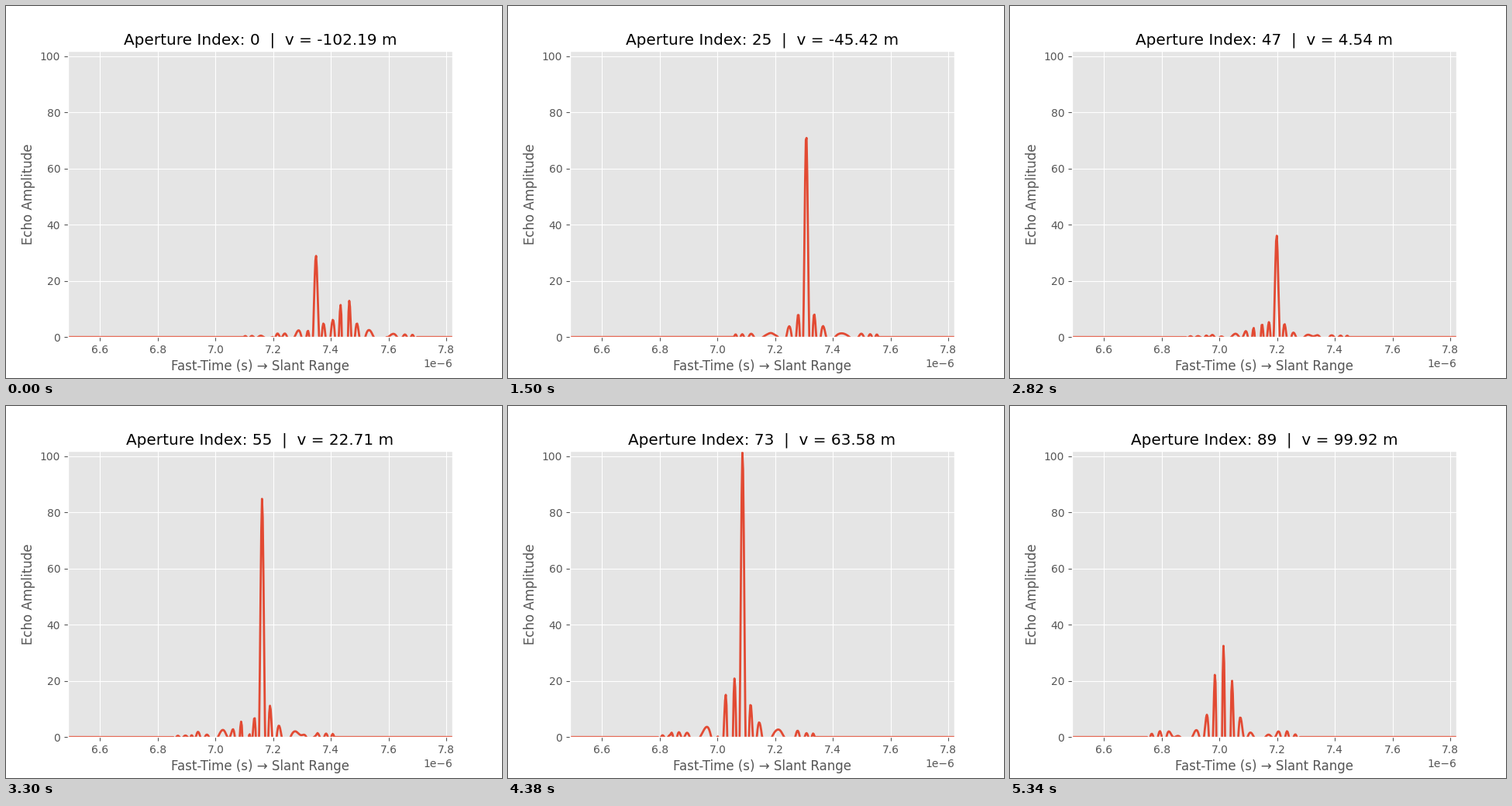
A matplotlib script that plays this animation: 640x480 px, repeating every 5400 ms.

```python
import numpy as np
import matplotlib.pyplot as plt
from matplotlib.animation import FuncAnimation

plt.style.use("ggplot")

# Radar and scene geometry (metres, seconds, hertz)
C = 3e8
CARRIER = 200e6
BAND = 100e6
PULSE = 0.25e-6
XC, YC, X0, Y0, HALF = 1000, 300, 20, 60, 100
STEPS = 90
DV = (XC + YC**2 / XC) * 2 / (16 * Y0)

TARGETS = [(1007.006, 270.1), (999.993, 328.34)]
DELAY = 0.1905e-6
PHASE = -0.29
GAIN = 100

# Fast-time window with a 10 percent guard on each side
near = 2 / C * np.hypot(XC - X0, YC - Y0 - HALF)
far = 2 / C * np.hypot(XC + X0, YC + Y0 + HALF) + PULSE
guard = 0.1 * (far - near)
DT = 2.5e-9
count = 2 * int(np.ceil((far - near + 2 * guard) / (2 * DT)))
t = near - guard + DT * np.arange(count)


def compressed(lag):
    """Autocorrelation of a linear chirp."""
    overlap = np.clip(1 - np.abs(lag) / PULSE, 0, None)
    return overlap * np.sinc(BAND * lag * overlap)


def echo(v):
    total = np.zeros_like(t)
    for x, y in TARGETS:
        trip = 2 / C * np.hypot(x, y - v)
        phase = 2 * np.pi * (CARRIER * trip + PHASE)
        total += GAIN * np.cos(phase) * compressed(t - trip - DELAY)
    return total


fig, ax = plt.subplots(figsize=(6.4, 4.8), dpi=100)
line, = ax.plot([], [], lw=2)
ax.set_xlim(t[0], t[-1])
ax.set_ylim(0, 101.95)
ax.set_xlabel("Fast-Time (s) → Slant Range")
ax.set_ylabel("Echo Amplitude")
title = ax.set_title("")


def update(i):
    v = (i - STEPS // 2) * DV
    line.set_data(t, echo(v))
    title.set_text(f"Aperture Index: {i}  |  v = {v:.2f} m")
    return line, title


anim = FuncAnimation(fig, update, frames=STEPS, interval=60,
                     repeat=True, repeat_delay=0, blit=False)
plt.show()
```
